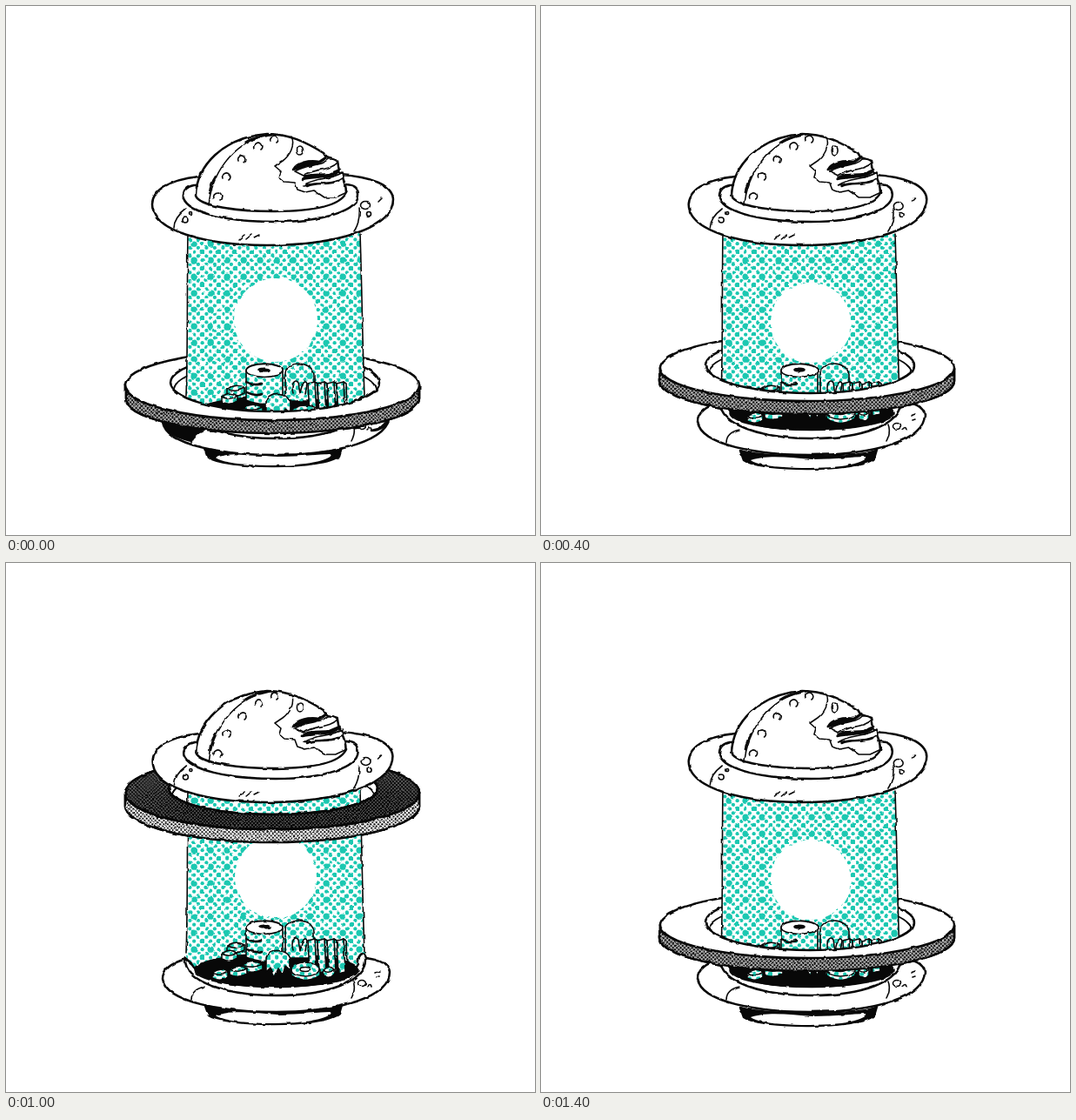
An HTML page for the animation above (1600 ms loop, 608 by 608 pixels).

```html
<!DOCTYPE html>
<html lang="en">
<head>
<meta charset="utf-8">
<title>Saucer capsule</title>
<style>
html, body { margin: 0; width: 100%; height: 100%; overflow: hidden; background: #fff; }
svg { display: block; width: 100%; height: 100%; }
.ink { stroke: #080808; stroke-width: 2.5; stroke-linecap: round; stroke-linejoin: round; }
.thin { stroke-width: 1.6; }
.line { fill: none; }
.white { fill: #fff; }
.black { fill: #080808; }
</style>
</head>
<body>
<svg viewBox="0 0 608 608">
  <defs>
    <pattern id="teal" width="19" height="19" patternUnits="userSpaceOnUse" patternTransform="translate(209 266)"></pattern>
    <pattern id="grey" width="4.4" height="4.4" patternUnits="userSpaceOnUse">
      <path fill="#fff" d="M0 0h5v5H0z"/>
      <path fill="#080808" d="M2.2 .5L3.9 2.2 2.2 3.9 .5 2.2zM0 0h1.7L0 1.7zM4.4 0v1.7L2.7 0zM0 4.4V2.7l1.7 1.7zM4.4 4.4H2.7l1.7-1.7z"/>
    </pattern>
    <pattern id="pale" width="4.4" height="4.4" patternUnits="userSpaceOnUse">
      <path fill="#fff" d="M0 0h5v5H0z"/>
      <circle cx="1.1" cy="1.1" r="1.05"/><circle cx="3.3" cy="3.3" r="1.05"/>
    </pattern>
    <pattern id="dark" width="4" height="4" patternUnits="userSpaceOnUse">
      <path fill="#080808" d="M0 0h5v5H0z"/>
      <g fill="#fff"><circle cx="1" cy="1" r=".62"/><circle cx="3" cy="3" r=".62"/></g>
    </pattern>
    <radialGradient id="edge" cx=".56" cy=".75" r=".62">
      <stop offset=".55" stop-color="#000"/><stop offset="1" stop-color="#fff"/>
    </radialGradient>
    <mask id="fade" maskContentUnits="objectBoundingBox"><path d="M0 0h1v1H0z" fill="url(#edge)"/></mask>
    <filter id="rough" filterUnits="userSpaceOnUse" x="0" y="0" width="608" height="608" color-interpolation-filters="sRGB">
      <feTurbulence id="noise" type="fractalNoise" baseFrequency=".09" numOctaves="2" result="n"/>
      <feDisplacementMap in="SourceGraphic" in2="n" scale="3" xChannelSelector="R" yChannelSelector="G"/>
    </filter>
    <clipPath id="front"><rect id="cut" width="608" height="608"/></clipPath>
  </defs>
  <g id="scene" filter="url(#rough)"></g>
</svg>
<script>
(() => {
const $ = id => document.getElementById(id);
const TEAL = '#1bc8b1';

const path = (d, cls = 'line', more = '') => `<path class="ink ${cls}" d="${d}" ${more}/>`;
const oval = (x, y, rx, ry = rx) =>
  `M${x - rx},${y}a${rx},${ry} 0 1 0 ${2 * rx},0a${rx},${ry} 0 1 0 ${-2 * rx},0z`;
const tinted = d => `<path d="${d}" fill="#fff"/>` + path(d, 'thin', 'fill="url(#teal)"');

// Checkered dots with two heavier clumps per tile
let dots = '';
for (let i = 0; i < 4; i++) for (let j = 0; j < 4; j++) {
  if ((i + j) % 2) continue;
  const r = i === 1 && j === 1 ? 3.7 : i === 3 && j === 3 ? 3 : 2.15;
  dots += `<circle cx="${2.4 + i * 4.75}" cy="${2.4 + j * 4.75}" r="${r}" fill="${TEAL}"/>`;
}
$('teal').innerHTML = dots;

// Small differences between the drawings of the body
const bodies = {
  A: { seed: 2, wide: 1, foot: 0, spot: [310, 361, 48], mark: [413, 229] },
  B: { seed: 9, wide: .988, foot: 3, spot: [310, 364, 46], mark: [412, 230] },
  C: { seed: 17, wide: .996, foot: 1, spot: [310, 361, 47], mark: [414, 228] },
  D: { seed: 23, wide: .996, foot: 1, spot: [310, 361, 47], mark: [414, 228] }
};

// Ring face centre and depth, hole offset and depth, light at the edge
const low = { x: 306, y: 436, ry: 40, hx: 3, hy: -3, hr: 33 };
const rising = { x: 306, y: 416, ry: 38, hx: 3, hy: -3, hr: 32 };
const high = { x: 313, y: 281, ry: 41, hx: -2, hy: -9, hr: 28, dark: true, glow: 1 };
const peak = { x: 306, y: 263, ry: 42, hx: 1, hy: -5, hr: 30, dark: true, glow: .25 };
const poses = [
  ['A', low], ['C', { ...low, y: 434 }], ['B', rising], ['A', high],
  ['C', peak], ['D', { ...peak, y: 264 }], ['A', high], ['B', rising]
];

function ring({ x, y, ry, hx, hy, hr, dark, glow }) {
  const rx = 169, rim = 15, cx = x + hx, cy = y + hy;
  const face = oval(x, y, rx, ry) + oval(cx, cy, 120, hr);
  const side = `M${x - rx},${y}v${rim}A${rx},${ry} 0 0 0 ${x + rx},${y + rim}v${-rim}A${rx},${ry} 0 0 1 ${x - rx},${y}z`;
  const fill = id => `fill="url(#${id})" fill-rule="evenodd"`;
  // Only the front half of the side wall shows; the hole stays open
  const wall = side.replace('0 0 1', '0 0 1').replace(/A[^A]*z$/, `A${rx},${ry} 0 0 1 ${x - rx},${y}z`);
  return path(wall, '', fill(dark ? 'pale' : 'grey')) +
    (dark
      ? path(face, '', fill('dark')) +
        `<path d="${face}" ${fill('grey')} mask="url(#fade)" opacity="${glow}"/>` + path(face)
      : path(face, 'white', 'fill-rule="evenodd"')) +
    path(`M${cx - 116},${cy + 8}A114,${hr - 2} 0 0 1 ${cx + 116},${cy + 8}`, 'line thin');
}

function base(b, shaded) {
  return `<g transform="translate(0 ${b.foot})">` +
    path('M229,508C250,516 370,518 386,507L383,517C365,533 250,532 233,519Z', 'black') +
    `<path class="white" d="M241,519C262,512 290,517 312,518C340,518 360,515 372,515C379,517 362,528 309,528C272,528 246,524 241,519Z"/></g>` +
    path('M207,455C189,460 180,468 180,478C184,505 250,516 310,516C382,516 441,499 441,470C440,461 430,456 413,454', 'white') +
    path('M228,487C219,489 213,494 213,502M399,481C402,488 400,494 397,500M425,471l5-2M427,476l3-1', 'line thin') +
    path(oval(409, 483, 4.5, 3.5) + 'M415,487q4-5 5,0', 'line thin') +
    (shaded ? path('M180,477L229,487C220,490 215,495 213,500C195,496 183,489 180,477ZM441,474L428,486 420,488C430,488 439,482 441,474Z', 'black') : '');
}

function tube(b) {
  const [x, y, r] = b.spot;
  const body = 'M209,262C208,320 209,400 207,452Q215,480 310,480Q405,480 412,452C410,400 409,320 407,262Z';
  return `<path class="white" d="${body}"/><path d="${body}" fill="url(#teal)"/>` +
    `<circle class="white" cx="${x}" cy="${y}" r="${r}"/>` +
    path('M209,262C208,320 209,400 207,448M407,262C409,320 410,400 412,448', 'line thin');
}

function machine() {
  const fins = [347, 358, 369, 380].map(x =>
    tinted(`M${x},434l8-2 2,37-8,2Z`) + path(`M${x + 8},432l3,2 1,30`, 'line thin')).join('');
  const boxes = [[264, 440, 10], [257, 449, 9], [283, 462, 12], [267, 467, 10], [246, 471, 9], [371, 468, 6]]
    .map(([x, y, r]) => tinted(`M${x - r},${y}q${r},-7 ${2 * r},-1v6q${-r},6 ${-2 * r},1Z`) +
      path(`M${x - r},${y}q${r},5 ${2 * r},-1`, 'line thin')).join('');
  return path('M206,454C204,482 255,497 311,497C367,497 415,482 413,454C410,444 404,452 405,460C395,480 355,487 311,487C267,487 225,481 215,462Z', 'white') +
    path(oval(311, 468, 94, 19), 'black thin') +
    tinted('M321,454V422C322,407 352,407 354,424V454Z') +
    path('M330,445C327,435 332,427 336,433L338,446C340,433 344,429 346,434L344,446', 'line thin') +
    fins +
    tinted('M276,419V453Q297,462 318,453V419A21,8 0 0 0 276,419Z') +
    path(oval(297, 419, 21, 7.5), 'white thin') + path(oval(297, 418, 6, 1.8), 'black thin') +
    path('M276,432q9,5 17,2M277,444q10,5 17,2') + boxes +
    tinted('M299,470V455C300,442 325,442 327,456V468L321,463 318,474 313,466 309,475 304,465Z') +
    tinted('M328,467v7q16,11 33,0v-7Z') + tinted(oval(344, 467, 16, 8)) + path(oval(344, 467, 6, 2.5), 'white thin');
}

function cap(b) {
  const rivets = [[308, 153], [290, 161], [271, 176], [253, 196], [243, 219]]
    .map(([x, y]) => `M${x - 4},${y + 2}a4.5,4.5 0 1 1 7,2`).join('');
  const [mx, my] = b.mark;
  return `<g transform="translate(${307 * (1 - b.wide)} 0) scale(${b.wide} 1)">` +
    path('M222,196C186,200 168,212 168,228C168,258 228,275 300,275C378,275 445,256 445,222C444,206 420,196 384,194Z', 'white') +
    path('M216,206C205,208 203,214 204,221C210,238 255,248 310,248C365,248 406,235 405,216C404,208 400,206 391,205Z', 'white') +
    path('M218,218C219,184 249,151 300,147C325,147 344,156 365,169L368,174 381,178 383,190C388,198 391,205 391,215C383,230 350,236 308,236C265,236 222,230 218,218Z', 'white') +
    path('M300,147C257,160 236,195 233,229M328,150C333,160 326,172 318,178L309,184 316,190 314,197 320,202 332,203 335,211 344,214 354,212 366,220 379,220 392,214', 'line thin') +
    path('M274,157Q285,149 307,147L291,151Z', 'black thin') +
    path('M234,215Q235,205 241,196') +
    path(rivets + oval(338, 166, 3.5, 5), 'line thin') +
    path('M330,188C334,180 348,177 360,179L369,173C360,184 345,183 330,188Z', 'black') +
    path('M332,190C347,181 362,185 370,176Q379,175 381,180C372,190 354,186 342,195Z', 'white thin') +
    path('M341,199C349,191 362,195 372,193L384,188C376,199 360,195 341,199Z', 'black') +
    path('M342,206C354,197 375,200 387,191L388,197C376,207 358,202 342,206Z', 'white thin') +
    path('M346,207C357,202 371,206 382,201') +
    path('M207,233C199,239 193,246 193,255M406,233C407,243 404,253 400,259M268,268l6-5M276,268l6-5M285,266l6-3', 'line thin') +
    path(oval(206, 246, 3) + oval(212, 238, 1.5), 'line thin') +
    path(oval(mx, my, 5.5, 4.5) + oval(mx + 4, my + 10, 2.5) + 'M428,225l4-4', 'line thin') + '</g>';
}

function draw([name, r]) {
  const b = bodies[name];
  $('noise').setAttribute('seed', b.seed);
  $('cut').setAttribute('y', r.y + r.hy);
  $('scene').innerHTML = base(b, r.y > 430) + ring(r) + tube(b) + machine() +
    `<g clip-path="url(#front)">${ring(r)}</g>` + cap(b);
}

let shown = -1;
function tick() {
  const step = Math.floor(performance.now() % 1600 / 200);
  if (step !== shown) draw(poses[shown = step]);
  requestAnimationFrame(tick);
}
tick();
})();
</script>
</body>
</html>
```
